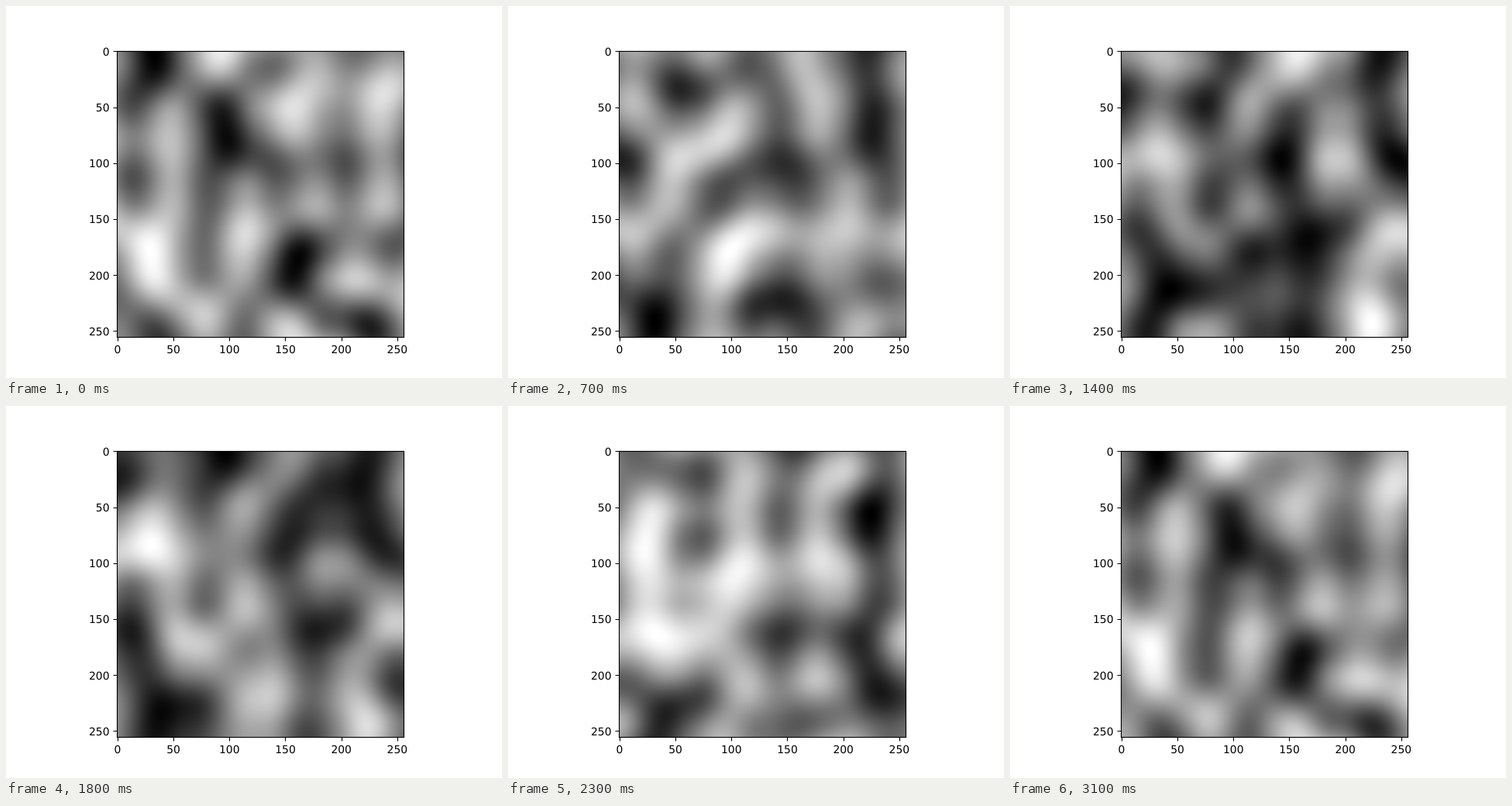
Recreate the animation shown at these times as an HTML page with a canvas. Size 640 by 480 pixels, loop 3.2 s.

```html
<!DOCTYPE html>
<html lang="en">
<head>
<meta charset="utf-8">
<title>Looping 3D gradient noise</title>
<style>
  html, body { margin: 0; width: 100%; height: 100%; overflow: hidden; background: #fff; }
  canvas { position: absolute; left: 143px; top: 57px; clip-path: inset(1px 0 0 0); }
  svg { position: absolute; left: 0; top: 0; }
  path, rect { fill: none; stroke: #000; stroke-width: 1.11; }
  text { font: 13.89px "DejaVu Sans", sans-serif; text-rendering: geometricPrecision; }
</style>
</head>
<body>
<canvas width="370" height="370"></canvas>
<svg width="640" height="480" viewBox="0 0 640 480">
  <rect x="143.5" y="58.5" width="370" height="369"/>
</svg>
<script>
const SIZE = 370, SAMPLES = 256, CELLS = 4, NODES = CELLS + 1;
const FRAMES = 32, STEP = 100;

// Mersenne Twister giving 53-bit fractions in [0, 1)
function twister(seed) {
  const N = 624, M = 397, mt = new Uint32Array(N);
  mt[0] = seed;
  for (let i = 1; i < N; i++) {
    mt[i] = Math.imul(1812433253, mt[i - 1] ^ (mt[i - 1] >>> 30)) + i;
  }
  let at = N;
  function next() {
    if (at === N) {
      for (let i = 0; i < N; i++) {
        const y = (mt[i] & 0x80000000) | (mt[(i + 1) % N] & 0x7fffffff);
        mt[i] = mt[(i + M) % N] ^ (y >>> 1) ^ (y & 1 ? 0x9908b0df : 0);
      }
      at = 0;
    }
    let y = mt[at++];
    y ^= y >>> 11;
    y ^= (y << 7) & 0x9d2c5680;
    y ^= (y << 15) & 0xefc60000;
    return (y ^ (y >>> 18)) >>> 0;
  }
  return () => {
    const high = next() >>> 5, low = next() >>> 6;
    return (high * 67108864 + low) / 9007199254740992;
  };
}

const random = twister(0);
const angles = () => Array.from({ length: NODES ** 3 }, () => 2 * Math.PI * random());
const theta = angles(), phi = angles();
const gradients = theta.map((a, i) => ({
  t: Math.sin(phi[i]) * Math.cos(a),
  y: Math.sin(phi[i]) * Math.sin(a),
  x: Math.cos(phi[i])
}));

const fade = t => t * t * t * (t * (t * 6 - 15) + 10);
const mix = (a, b, k) => a + (b - a) * k;

// Cell, offset and blend weight for each output pixel along one axis
const axis = Array.from({ length: SIZE }, (_, p) => {
  const sample = (p + 0.5) * SAMPLES / SIZE - 0.5;
  const pos = Math.min(SAMPLES - 1, Math.max(0, sample)) * CELLS / SAMPLES;
  const cell = Math.floor(pos);
  return { cell, d: pos - cell, k: fade(pos - cell) };
});

// Collapse the time axis: each lattice node becomes a value plus a 2D slope
function latticeAt(frame) {
  const time = frame * CELLS / FRAMES, plane = Math.floor(time);
  const d = time - plane, k = fade(d), area = NODES * NODES;
  return Array.from({ length: area }, (_, i) => {
    const a = gradients[plane * area + i];
    const b = gradients[(plane + 1) % CELLS * area + i];
    return {
      v: mix(a.t * d, b.t * (d - 1), k),
      y: mix(a.y, b.y, k),
      x: mix(a.x, b.x, k)
    };
  });
}

const ctx = document.querySelector("canvas").getContext("2d");

function render(frame) {
  const nodes = latticeAt(frame), values = new Float64Array(SIZE * SIZE);
  const ramp = (n, dy, dx) => n.v + n.y * dy + n.x * dx;
  let min = Infinity, max = -Infinity, i = 0;
  for (const r of axis) {
    for (const c of axis) {
      const n = r.cell * NODES + c.cell;
      const top = mix(ramp(nodes[n], r.d, c.d), ramp(nodes[n + 1], r.d, c.d - 1), c.k);
      const bottom = mix(ramp(nodes[n + NODES], r.d - 1, c.d),
                         ramp(nodes[n + NODES + 1], r.d - 1, c.d - 1), c.k);
      const v = mix(top, bottom, r.k);
      values[i++] = v;
      if (v < min) min = v;
      if (v > max) max = v;
    }
  }
  const image = ctx.createImageData(SIZE, SIZE);
  const pixels = new Uint32Array(image.data.buffer);
  const scale = 256 / (max - min);
  values.forEach((v, p) => {
    const g = Math.min(255, Math.floor((v - min) * scale));
    pixels[p] = 0xff000000 | g * 0x010101;
  });
  return image;
}

const svg = document.querySelector("svg");
function add(tag, attributes, label = "") {
  const el = document.createElementNS(svg.namespaceURI, tag);
  for (const name in attributes) el.setAttribute(name, attributes[name]);
  el.textContent = label;
  svg.append(el);
}

for (let value = 0; value <= 250; value += 50) {
  const offset = (value + 0.5) * 369.6 / SAMPLES;
  const x = 143.2 + offset, y = 57.6 + offset;
  add("path", { d: `M${Math.round(x) + 0.5} 427.5v5M143.5 ${Math.round(y) + 0.5}h-5` });
  add("text", { x, y: 448, "text-anchor": "middle" }, value);
  add("text", { x: 133.48, y: Math.round(y + 5.5), "text-anchor": "end" }, value);
}

const cache = [];
let shown = -1;
function draw() {
  const frame = Math.floor(performance.now() / STEP) % FRAMES;
  if (frame !== shown) {
    cache[frame] ??= render(frame);
    ctx.putImageData(cache[frame], 0, 0);
    shown = frame;
  }
  requestAnimationFrame(draw);
}
draw();
</script>
</body>
</html>
```
